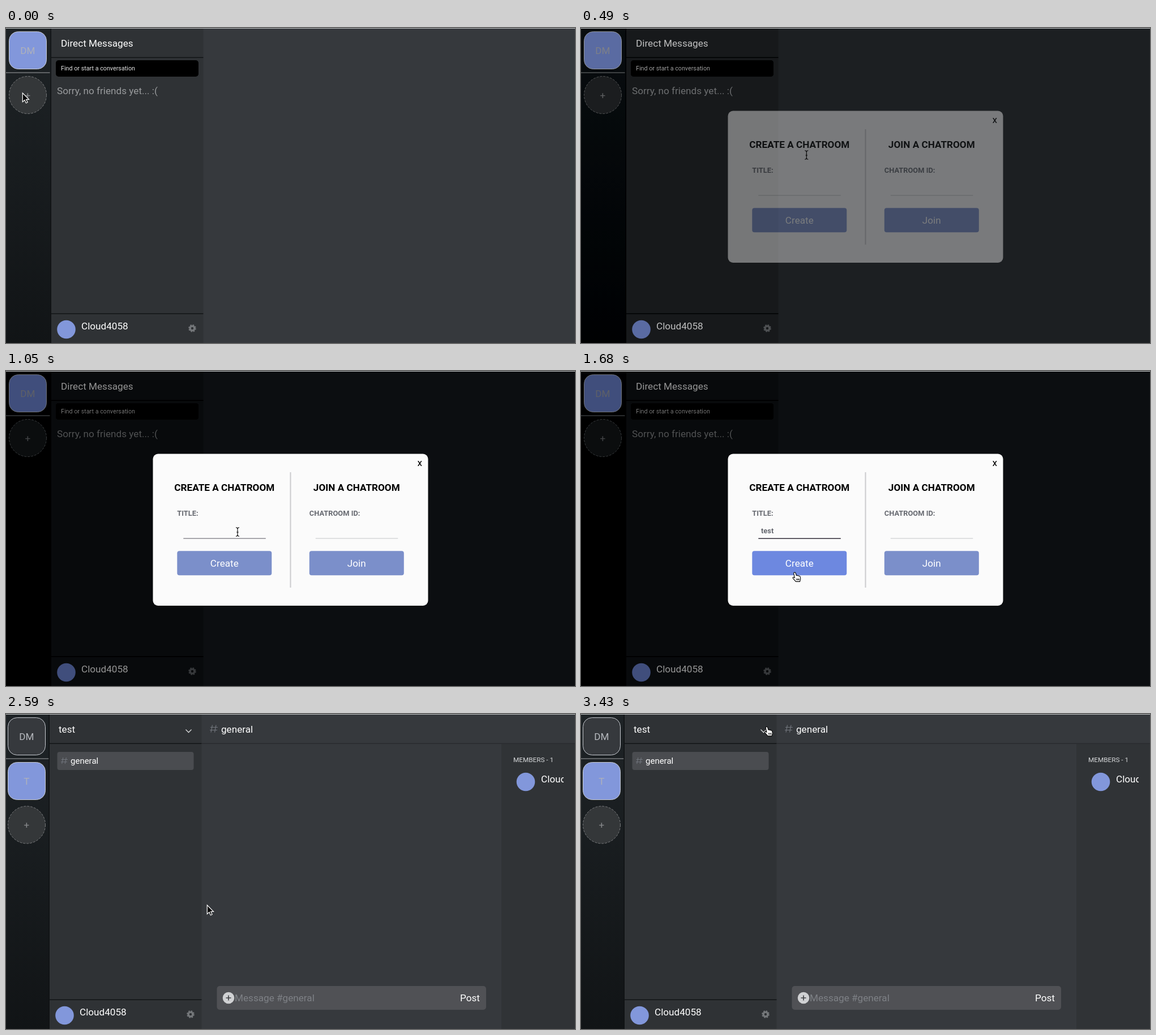
These frames come from a looping animation (1005x557 px, 3500 ms). An HTML page:

```html
<!DOCTYPE html>
<html lang="en">
<head>
<meta charset="utf-8">
<title>Create a chatroom</title>
<style>
  html, body { margin: 0; width: 100%; height: 100%; overflow: hidden; background: #36393d; }
  svg { position: absolute; left: 0; top: 0; }
  text { font-family: Roboto, Arial, sans-serif; font-size: 17.15px; fill: #fff; white-space: pre; }
  .mid { text-anchor: middle; }
  .bold { font-weight: 700; }
  .label { font-size: 12.86px; font-weight: 700; fill: #666970; }
</style>
</head>
<body>
<svg id="stage" width="1005" height="557" viewBox="0 0 1005 557"></svg>
<script>
const LOOP = 3500, STEP = 70;
const USER = 'Cloud4058';
const BLUE = '#8297db';

const rect = (x, y, w, h, fill, rx = 0, extra = '') =>
  `<rect x="${x}" y="${y}" width="${w}" height="${h}" rx="${rx}" fill="${fill}" ${extra}/>`;
const text = (x, y, s, attrs = '') => `<text x="${x}" y="${y}" ${attrs}>${s}</text>`;
const path = (d, stroke, width = 1, extra = '') =>
  `<path d="${d}" fill="none" stroke="${stroke}" stroke-width="${width}" ${extra}/>`;
const avatar = (x, y) => `<circle cx="${x}" cy="${y}" r="16.3" fill="${BLUE}"/>`;
const hash = (x, y, s) =>
  path('M4.5 0L2 13M11 0L8.5 13M1 4H14M0 9H13', '#72767d', 1.2, `transform="translate(${x} ${y}) scale(${s})"`);

// Server rail pieces
const tile = (y, label, fill, ink) =>
  rect(5.5, y + .5, 66, 66, fill, 16, 'stroke="#c9ccd2"') +
  text(38.3, y + 40, label, `class="mid" fill="${ink}" style="fill:${ink}"`);
const addButton = y =>
  `<circle cx="38.5" cy="${y}" r="33" fill="#343739" stroke="#7a7c7e" stroke-dasharray="4 2"/>` +
  text(38.3, y + 6, '+', 'class="mid" style="fill:#86888b"');
const rail = tiles => rect(0, 0, 82, 557, 'url(#rail)') + tiles + rect(0, 78.5, 77.5, 1, '#a4a6a8');

const gear =
  `<g fill="none" stroke="#74777a" transform="translate(329 531)">
    <circle r="3.9" stroke-width="3.4"/>
    <circle r="5.8" stroke-width="2" stroke-dasharray="2.5 2.055"/></g>`;
const panel = body =>
  rect(78.5, 0, 2, 557, '#101214') + rect(80, 0, 268.5, 557, '#2f3235') +
  rect(80, 51.5, 268.5, 1.5, '#121416') + rect(80, 504.5, 268.5, 1.5, '#121416') +
  avatar(106.5, 533) + text(133, 533, USER) + gear + body;

const home =
  rail(tile(6, 'DM', BLUE, '#aeb1bb') + addButton(118.5)) +
  panel(
    text(97, 32.5, 'Direct Messages') +
    rect(88, 57, 252, 29, '#000', 5) +
    text(97, 75.4, 'Find or start a conversation', 'style="font-size:10.75px;fill:#e4e4e4"') +
    text(90, 117.3, 'Sorry, no friends yet... :(', 'style="fill:#999b9d"'));

const room =
  `<g transform="translate(-2)">${rail(
    tile(6, 'DM', '#36393d', '#b6b9be') + tile(85, 'T', BLUE, '#aeb1bb') + addButton(196))}</g>` +
  `<g transform="translate(-3)">${panel(
    text(96, 32.5, 'test') +
    rect(93.5, 67, 241, 32, '#4a4c50', 4, 'id="channel"') +
    hash(100, 77, .85) +
    text(117, 88, 'general', 'style="font-size:15px"') +
    path('M320.5 27.5l5 5 5-5', '#dcddde', 1.3))}</g>` +
  rect(345.5, 51.5, 660, 1.5, '#292b2f') + hash(360, 19.5, 1) + text(380, 32.5, 'general') +
  rect(875, 53, 130, 504, '#303336') +
  text(896, 85, 'MEMBERS - 1', 'style="font-size:11.75px;fill:#d6d8da"') +
  avatar(918, 120) + `<g clip-path="url(#cut)">${text(945, 121, USER)}</g>` +
  rect(372.5, 481, 475.5, 42, '#505155', 5) +
  `<circle cx="393" cy="502" r="10.3" fill="#d0d1d3"/>` + path('M388.5 502h9M393 497.5v9', '#3c3e42', 1.6) +
  text(404, 508, 'Message #general', 'style="fill:#7e8186"') + text(802, 508, 'Post');

const form = (x, heading, label, button, id) =>
  text(x + 83.5, 212, heading, 'class="mid bold" style="fill:#000"') +
  text(x, 256, label, 'class="label"') +
  rect(x + 11, 295.5, 145.5, 1, '#c4c5c7', 0, `id="${id}Line"`) +
  rect(x, 318.3, 167, 43, '#7b8fca', 4, `id="${id}Button"`) +
  text(x + 83.5, 346.3, button, 'class="mid"');

const modal =
  rect(259.5, 146.5, 486, 268.5, '#fbfbfb', 9) +
  rect(501.5, 179, 2, 204, '#cbccce') +
  text(730.8, 168, 'X', 'class="mid" style="font-size:12.86px;font-weight:500;fill:#000"') +
  form(302.3, 'CREATE A CHATROOM', 'TITLE:', 'Create', 'create') +
  form(535.8, 'JOIN A CHATROOM', 'CHATROOM ID:', 'Join', 'join') +
  text(318, 287, '', 'class="label" id="typed"');

const cursors =
  `<path id="arrow" d="M.8 1V16.6L4.5 13.2 6.9 18.7 9.6 17.5 7.2 12.3H12Z" fill="#000" stroke="#fff" stroke-width="1.2"/>
  <g id="hand" stroke="#000" stroke-width="1.1" stroke-linejoin="round">
    <path fill="#fff" d="M4.5 1C5.7 1 6.1 1.8 6.4 3L7.3 6.6C8 6 9.2 6.1 9.6 7 10.4 6.5 11.4 6.7 11.8 7.6 12.9 7.2 13.9 7.8 14.1 8.8L14.7 12C14.9 13.8 14 15 13.6 17.4H6.5L1.6 11.8C.8 10.6 1.2 9.6 2.2 9.5 3.1 9.5 3.8 10.2 4.5 11L2.8 3.2C2.6 2 3.2 1 4.5 1Z"/>
    <path fill="none" d="M7.8 12l.5 3M9.9 12l.4 3M12 12l.2 3"/></g>
  <path id="beam" d="M1 .8Q4 .8 4 3V14Q4 16.2 1 16.2M7 .8Q4 .8 4 3M7 16.2Q4 16.2 4 14M2.3 9H5.7" fill="none" stroke="#000" stroke-width="1.1"/>`;

document.getElementById('stage').innerHTML =
  `<defs>
    <linearGradient id="rail" x2="0" y2="1"><stop stop-color="#1e2326"/><stop offset="1" stop-color="#111416"/></linearGradient>
    <clipPath id="cut"><rect x="940" y="100" width="45" height="40"/></clipPath>
  </defs>` +
  rect(0, 0, 1005, 557, '#36393d', 0, 'id="back"') +
  `<g id="home">${home}</g><g id="room">${room}</g><g id="modal">${modal}</g>` +
  rect(0, 0, 1005, 1, '#c3c5c6') + cursors;

const el = id => document.getElementById(id);

// Pointer track: time, x, y, shape from that time on
const track = [
  [0, 28.5, 114, 'arrow'], [70, 31, 112, 'hand'], [140, 32, 112, 'hand'], [280, 32, 112, 'hand'],
  [350, 150, 148, 'arrow'], [490, 394.3, 216, 'beam'], [560, 416, 238, 'arrow'],
  [700, 430, 255.5, 'arrow'], [840, 428, 262, 'arrow'], [910, 414, 274, 'beam'],
  [1050, 405, 276, 'beam'], [1120, 405, 276, ''], [1400, 396, 301, 'arrow'],
  [1470, 386, 334, 'hand'], [1540, 373, 355, 'hand'], [1960, 373, 355, 'hand'],
  [2310, 351.5, 338.5, 'hand'], [2590, 354.5, 337, 'arrow'], [2800, 335, 180, 'arrow'],
  [2940, 312, 76, 'hand'], [3010, 312, 76, 'hand'], [3150, 316, 48, 'arrow'],
  [3290, 322, 21.5, 'hand'], [3360, 322, 21.5, 'hand'], [3430, 323.5, 21.5, 'hand'], [LOOP, 323.5, 21.5, 'hand']
];

const clamp = v => Math.min(1, Math.max(0, v));
const mix = (a, b, p) => a + (b - a) * p;
const blend = (a, b, p) => `rgb(${a.map((v, i) => Math.round(mix(v, b[i], p)))})`;
const show = (id, on) => el(id).style.display = on ? '' : 'none';

function drawPointer(t) {
  const i = track.findIndex(k => k[0] > t) - 1;
  const [t0, x0, y0, shape] = track[i], [t1, x1, y1] = track[i + 1];
  const p = (t - t0) / (t1 - t0);
  for (const id of ['arrow', 'hand', 'beam']) show(id, id === shape);
  if (shape) el(shape).setAttribute('transform', `translate(${mix(x0, x1, p)} ${mix(y0, y1, p)})`);
}

function draw(t) {
  const inRoom = t >= 2590;
  show('home', !inRoom);
  show('room', inRoom);
  show('modal', !inRoom && t >= 280);

  // The page darkens while the dialog fades in
  const fade = inRoom ? 0 : 1 - (1 - clamp((t - 265) / 600)) ** 2.2;
  const dim = fade ? `brightness(${1 - .43 * fade}) contrast(${1 + .19 * fade})` : 'none';
  el('home').style.filter = el('back').style.filter = dim;
  el('modal').style.opacity = fade * fade;

  el('typed').textContent = 'test'.slice(0, Math.max(0, Math.floor((t - 1050) / 70)));
  const focus = clamp((t - 980) / 140) * (1 - clamp((t - 1680) / 140));
  el('createLine').setAttribute('fill', blend([196, 197, 199], [34, 28, 42], focus));
  el('createLine').setAttribute('height', 1 + .4 * focus);

  const hover = clamp((t - 1400) / 140), press = clamp((t - 1680) / 140);
  el('createButton').setAttribute('fill', press
    ? blend([109, 136, 224], [156, 188, 255], press)
    : blend([123, 143, 202], [109, 136, 224], hover));

  el('channel').setAttribute('fill', t >= 2940 && t < 3150 ? '#53555a' : '#4a4c50');
  drawPointer(t);
}

function tick() {
  const t = performance.now() % LOOP;
  draw(Math.floor(t / STEP) * STEP);
  requestAnimationFrame(tick);
}
tick();
</script>
</body>
</html>
```
